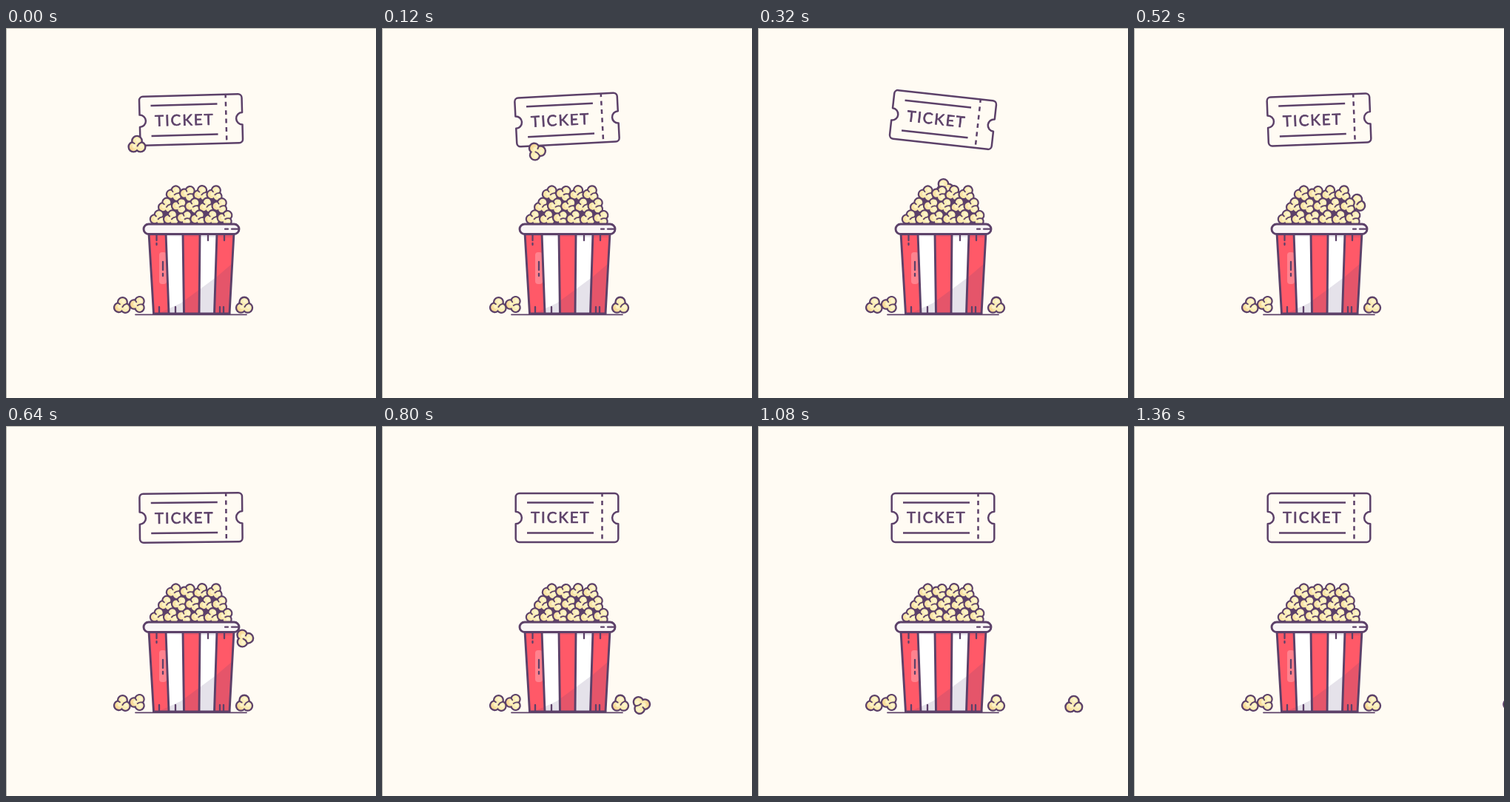
Animation, 500 px wide and 500 px high, one loop 1440 ms. Source, as an HTML page with a canvas:

```html
<!DOCTYPE html>
<html lang="en">
<head>
<meta charset="utf-8">
<title>Popcorn and ticket</title>
<style>
  html, body { margin: 0; width: 100%; height: 100%; overflow: hidden; background: #fffbf3; }
  canvas { display: block; width: 500px; height: 500px; }
</style>
</head>
<body>
<canvas id="stage" width="500" height="500"></canvas>
<script>
const ctx = document.getElementById('stage').getContext('2d');
const LOOP = 1440, STEP = 40, LAST = 1360, LANDING = 800, GRAVITY = 0.000525;
const PAPER = '#fffbf3', INK = '#5c4169', RED = '#ff5968', SHADE = 'rgba(85,60,115,.15)';

// Turning points of the ticket (time, degrees) and bounces of the kernel (time, x, y)
const swing = [[0, -1.5], [80, -3.5], [385, 7.6], [535, -2.5], [690, 0]];
const bounces = [[0, 177, 158], [200, 230, 181], [320, 252, 216], [520, 301, 237], [LANDING, 350, 377]];

const radians = degrees => degrees * Math.PI / 180;
const mix = (a, b, u) => a + (b - a) * u;
const smooth = u => u * u * (3 - 2 * u);

function span(keys, t) {
  let i = 0;
  while (i < keys.length - 2 && t >= keys[i + 1][0]) i++;
  const [a, b] = [keys[i], keys[i + 1]], time = b[0] - a[0];
  return { a, b, time, u: Math.min(1, (t - a[0]) / time) };
}

function ticketAngle(t) {
  const { a, b, u } = span(swing, t);
  return mix(a[1], b[1], smooth(u));
}

function kernelAt(t) {
  if (t >= LANDING) {
    const hop = t > 1120 ? 6 * Math.sin(Math.PI * (t - 1120) / 240) : 0;
    const roll = smooth(Math.min(1, (t - LANDING) / 580));
    return [350 + 162 * roll, 377 - hop, 560 + (t - LANDING) * 4 / 7];
  }
  const { a, b, time, u } = span(bounces, t);
  const sag = GRAVITY * time * time * u * (1 - u);
  return [mix(a[1], b[1], u), mix(a[2], b[2], u) - sag, t * 0.7];
}

function pen(width) {
  ctx.strokeStyle = INK;
  ctx.lineWidth = width;
  ctx.lineCap = ctx.lineJoin = 'round';
}

function line(x1, y1, x2, y2) {
  ctx.beginPath();
  ctx.moveTo(x1, y1);
  ctx.lineTo(x2, y2);
  ctx.stroke();
}

function poly(color, ...points) {
  ctx.beginPath();
  points.forEach(([x, y]) => ctx.lineTo(x, y));
  ctx.fillStyle = color;
  ctx.fill();
}

function disc(x, y, r, color) {
  ctx.beginPath();
  ctx.arc(x, y, r, 0, 7);
  ctx.fillStyle = color;
  ctx.fill();
}

function rounded(x, y, w, h, r, color) {
  ctx.beginPath();
  ctx.roundRect(x, y, w, h, r);
  ctx.fillStyle = color;
  ctx.fill();
}

function popcorn(x, y, degrees, size = 1, shadow = '#f6c983') {
  ctx.save();
  ctx.translate(x, y);
  ctx.rotate(radians(degrees));
  ctx.scale(size, size);
  const fill = ctx.createLinearGradient(-10, 8, 3, -3);
  fill.addColorStop(0, shadow);
  fill.addColorStop(0.5, '#faeaae');
  fill.addColorStop(1, '#fbefba');
  const eachLobe = draw => [-90, 30, 150].forEach(d =>
    draw(5.4 * Math.cos(radians(d)), 5.4 * Math.sin(radians(d))));
  eachLobe((a, b) => disc(a, b, 7.9, INK));
  eachLobe((a, b) => disc(a, b, 5.5, fill));
  disc(0, 0, 4.5, fill);
  eachLobe((a, b) => disc(a + 1, b - 1, 2.4, 'rgba(255,249,222,.55)'));
  // Creases run inward from the gaps between the lobes
  pen(2);
  ctx.beginPath();
  ctx.moveTo(5.5, -3.2);
  ctx.quadraticCurveTo(2, -2, 0.5, 1.5);
  ctx.moveTo(-5.5, -3.2);
  ctx.lineTo(-3.4, -2);
  ctx.stroke();
  ctx.restore();
}

function ticket(degrees) {
  const w = 69.3, h = 33, notch = 8.2, quarter = Math.PI / 2;
  ctx.save();
  ctx.translate(250, 124);
  ctx.rotate(radians(degrees));
  pen(2.5);
  ctx.beginPath();
  ctx.moveTo(0, -h);
  ctx.arcTo(w, -h, w, 0, 5);
  ctx.arc(w, 0, notch, -quarter, quarter, true);
  ctx.arcTo(w, h, 0, h, 5);
  ctx.arcTo(-w, h, -w, 0, 5);
  ctx.arc(-w, 0, notch, quarter, -quarter, true);
  ctx.arcTo(-w, -h, 0, -h, 5);
  ctx.closePath();
  ctx.stroke();
  ctx.lineCap = 'butt';
  for (const y of [-20.5, 20.5]) line(-54, y, 36, y);
  ctx.setLineDash([6, 5.4]);
  ctx.lineDashOffset = 1.4;
  line(47.5, -h, 47.5, h);
  ctx.setLineDash([]);
  ctx.font = '400 20.5px Lato, sans-serif';
  ctx.letterSpacing = '1.9px';
  ctx.fillStyle = INK;
  ctx.lineWidth = 0.7;
  ctx.fillText('TICKET', -49, 7.4);
  ctx.strokeText('TICKET', -49, 7.4);
  ctx.restore();
}

function heap() {
  poly(INK, [200, 264], [208, 238], [232, 222], [272, 222], [288, 238], [300, 264]);
  for (let row = 0; row < 3; row++) {
    const count = 4 + row;
    for (let i = 0; i < count; i++) {
      const x = 255 - 2 * row + (i - (count - 1) / 2) * 18.2;
      popcorn(x, 224 + 16.5 * row, 22 + 14 * Math.sin(5 * row + 2 * i), 0.9, '#f8dc9c');
    }
  }
}

function bucket() {
  const top = i => [193 + 23 * i, 277], foot = i => [199.5 + 20.5 * i, 386];
  for (let i = 0; i < 5; i++) {
    poly(i % 2 ? '#fff' : RED, top(i), top(i + 1), foot(i + 1), foot(i));
  }
  poly(SHADE, [306, 318], [285, 336], [262, 353], [236, 372], [205, 386], [302, 386]);
  poly(SHADE, top(0), top(5), [308, 283], [193, 281]);
  rounded(207, 303, 10, 43, 4, 'rgba(255,255,255,.25)');

  pen(2.9);
  for (let i = 0; i < 6; i++) line(...top(i), ...foot(i));
  line(...foot(0), ...foot(5));
  pen(2.3);
  for (const x of [203.5, 273, 295]) line(x, 280, x, 287);
  for (const x of [207, 229, 289, 294]) line(x, 377, x, 385);
  line(203.5, 291, 203.5, 293);
  line(212, 316, 212, 327);
  line(212, 332, 212, 335);

  rounded(186, 265, 129, 13.5, 6.7, '#f9f5f6');
  pen(2.9);
  ctx.stroke();
  pen(2.2);
  line(296, 271.7, 300, 271.7);
  line(305, 271.7, 314, 271.7);
  pen(1.8);
  line(175, 387.3, 325, 387.3);
}

function draw(t) {
  ctx.fillStyle = PAPER;
  ctx.fillRect(0, 0, 500, 500);
  ticket(ticketAngle(t));
  popcorn(...kernelAt(t));
  heap();
  bucket();
  popcorn(178, 373.5, 30, 0.92);
  popcorn(157, 375.5, 5, 0.95);
  popcorn(322, 375.5, 0, 0.97);
  ctx.fillStyle = '#b9b6b0';
  ctx.fillRect(0, 0, 500, 1);
  ctx.fillRect(0, 0, 1, 500);
}

const start = performance.now();
function tick() {
  const t = (performance.now() - start) % LOOP;
  draw(Math.min(LAST, Math.floor(t / STEP) * STEP));
  requestAnimationFrame(tick);
}
tick();
</script>
</body>
</html>
```
